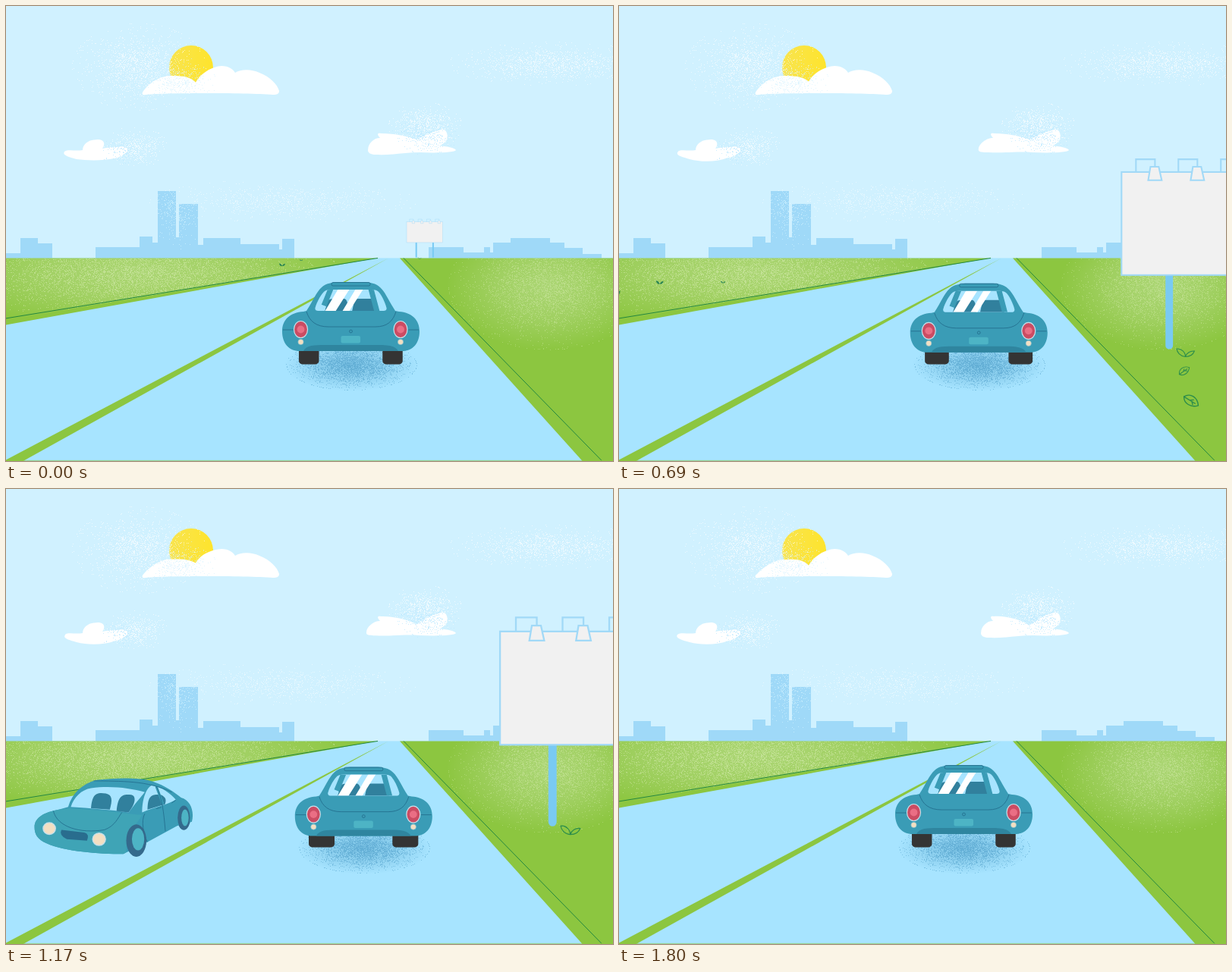
Recreate the animation shown at these times as an HTML page. Size 800 by 600 pixels, loop 1.83 s.

```html
<!DOCTYPE html>
<html lang="en">
<head>
<meta charset="utf-8">
<title>Country drive</title>
<style>
html, body { margin: 0; width: 100%; height: 100%; overflow: hidden; background: #d0f1ff; }
svg { display: block; width: 100%; height: 100%; }
.line { fill: none; stroke: #24708f; stroke-width: .9; }
.leaf { fill: none; stroke: #2b8c4b; }
</style>
</head>
<body>
<svg viewBox="0 0 800 600" preserveAspectRatio="none">
  <defs>
    <clipPath id="leftField"><path d="M0 333H488L0 414Z"/></clipPath>
    <clipPath id="rightField"><path d="M525 333H800V600H785Z"/></clipPath>
    <clipPath id="towers"><path d="M200 244H224V333H200ZM228 261H253V333H228Z"/></clipPath>
    <clipPath id="rearGlass"><path id="glassShape" d="M407.5 398C410 389 416 379 420 376C423 374 427 374 432 374H478C483 374 487 374 490 376C494 379 499 389 501.5 398C502 401 500 402 497 402H412C409 402 407 401 407.5 398Z"/></clipPath>
    <radialGradient id="haze"><stop offset="0" stop-color="#fff" stop-opacity=".28"/><stop offset=".5" stop-color="#fff" stop-opacity=".18"/><stop offset="1" stop-color="#fff" stop-opacity="0"/></radialGradient>
    <radialGradient id="shade"><stop offset="0" stop-color="#4a9cc5" stop-opacity=".45"/><stop offset=".5" stop-color="#4a9cc5" stop-opacity=".28"/><stop offset="1" stop-color="#4a9cc5" stop-opacity="0"/></radialGradient>
    <linearGradient id="sunlight"><stop offset="0" stop-color="#f8e450"/><stop offset="1" stop-color="#fee42c"/></linearGradient>
    <path id="sprout" fill="#2b8554" d="M0 .25C-.25 .3 -.45 .1 -.5 -.2C-.25 -.2 -.05 0 0 .25C.1 0 .3 -.15 .5 -.15C.45 .15 .25 .3 0 .25Z"/>
    <path id="blade" class="leaf" stroke-width=".06" d="M-.5 0C-.3 -.4 .2 -.4 .5 0C.2 .35 -.3 .35 -.5 0L.3 0M-.1 0L.1 -.15M.05 0L.2 .14"/>
    <g id="lamp">
      <path fill="none" d="M3.84 0V-3.4H8.9V-1.4"/>
      <path fill="#f1f1f1" d="M7.7 -1.4H9.9L10.7 2.2H7.1Z"/>
    </g>
    <g id="board">
      <path d="M12.7 27.4V46.2M34.9 27.4V46.2" stroke="#79caf3" stroke-width="2" stroke-linecap="round"/>
      <g stroke="#a1d9f7" stroke-width=".42">
        <rect width="47.6" height="27.45" fill="#f1f1f1"/>
        <use href="#lamp"/><use href="#lamp" x="11.3"/><use href="#lamp" x="22.6"/><use href="#lamp" x="33.9"/>
      </g>
      <path class="leaf" stroke-width=".22" d="M17 49.2C15.5 49 14.8 48 14.7 47.1C16 47 17 48 17 49.2C17.3 48.2 18.3 47.6 19.4 47.7C19 48.8 18 49.2 17 49.2Z"/>
    </g>
    <g id="tail">
      <ellipse rx="9" ry="11" fill="#cb4c63" stroke="#c5e0ea" stroke-width="1.2"/>
      <circle r="4.9" fill="#ea6e84"/>
      <circle cy="16.5" r="3.6" fill="#f3dfc2" stroke="#8cc3d0" stroke-width=".7"/>
    </g>
  </defs>

  <rect width="800" height="600" fill="#d0f1ff"/>
  <circle cx="244" cy="81" r="29" fill="url(#sunlight)"/>
  <g id="clouds" fill="#fff"></g>
  <path fill="#9fd9f8" d="M0 333V326H19V306H42V313H61V333ZM118 333V318H176V304H193V312H200V244H224V305H228V261H253V315H260V306H309V314H360V321H364V307H380V333ZM557 333V318H603V325H630V318H638V325H642V312H665V306H717V312H736V319H760V327H785V333Z"/>
  <g id="skyDust"></g>

  <g id="ground" transform="translate(0 -.6)">
    <rect y="333" width="800" height="268" fill="#a7e4ff"/>
    <path fill="#8cc640" d="M0 333H488L0 421ZM519 333H800V601H760ZM504 333L0 599V601H22Z"/>
    <g clip-path="url(#leftField)"><ellipse cx="180" cy="352" rx="290" ry="75" fill="url(#haze)"/></g>
    <g clip-path="url(#rightField)"><ellipse cx="715" cy="370" rx="135" ry="85" fill="url(#haze)"/></g>
    <g id="fieldDust"></g>
    <path d="M0 412.5L490 333M524 333L785 600" fill="none" stroke="#23873f"/>
    <path d="M0 600H800" stroke="#8cc640" opacity=".6"/>
  </g>

  <g id="roadside"></g>

  <g id="oncoming">
    <ellipse cx="377" cy="378" rx="5" ry="9" fill="#346a8c"/>
    <path fill="#3a9cb6" d="M266 385C266 378 273 374 284 372L291 370C294 360 301 353 312 350C326 348 345 348 354 351C363 354 370 359 375 363C382 365 385 373 383 381L372 384L350 396L332 405C314 405 288 403 275 397C268 394 266 390 266 385Z"/>
    <path fill="#3fa4b6" d="M266 385C266 378 273 374 284 372L292 371C307 372 322 373 336 375L346 376C342 383 335 388 334 404L332 405C314 405 288 403 275 397C268 394 266 390 266 385Z"/>
    <path fill="#a7e4ff" d="M293 370C295 363 301 357 308 356C323 354 337 356 348 359C343 365 339 370 336 374C322 372 307 371 293 370Z"/>
    <path fill="#31809d" d="M308 371C309 360 312 359 319 360C324 361 324 365 322 372ZM327 373C328 362 331 360 338 361C342 362 341 368 336 374Z"/>
    <path fill="#a7e4ff" d="M346 374C346 364 349 356 353 354C361 355 367 360 371 364.5C366 368 356 370 346 374Z"/>
    <path fill="#31809d" d="M350 372C350 362 353 360 360 361C364 363 364 365 363 368Z"/>
    <path fill="none" stroke="#3a9cb6" stroke-width="1.8" d="M356.5 354.5L361.5 368"/>
    <g class="line" style="stroke-width:.5">
      <path d="M310 350.5C330 351 350 350 368 359M356.6 354.7C361 364 362 373 363.3 388M356.6 371.3L360.3 370.2M368 367L371 365M348 375C345 380 347 391 350 396"/>
      <path d="M280 373C283 385 300 390 318 387C326 384 328 378 331 374"/>
    </g>
    <ellipse cx="377" cy="378" rx="4.6" ry="9" fill="#346a8c"/>
    <ellipse cx="377.9" cy="378" rx="2.7" ry="6.2" fill="#4db4c5"/>
    <ellipse cx="341.7" cy="395" rx="7.5" ry="12" fill="#346a8c"/>
    <ellipse cx="343" cy="394" rx="4.6" ry="8.2" fill="#4db4c5"/>
    <path fill="#296d8e" d="M286 387L303 389Q307 390 305 395L290 394Q284 391 286 387Z"/>
    <g fill="#f3dfc2" stroke="#c5e0ea" stroke-width=".8">
      <ellipse cx="277" cy="386" rx="4.6" ry="4.4"/><ellipse cx="314" cy="394" rx="4.8" ry="4.6"/>
    </g>
  </g>

  <g id="shadow"><ellipse cx="455" cy="474" rx="88" ry="34" fill="url(#shade)"/></g>
  <g fill="#343434">
    <rect id="wheelL" y="450" height="22.4" rx="4.5"/>
    <rect id="wheelR" y="450" height="22.4" rx="4.5"/>
  </g>
  <g id="car">
    <path fill="#3a9cb6" d="M364 429C364 414 374 404 392 403L396 402C404 390 409 377 416 371C421 366 430 364 440 364H470C480 364 488 366 493 371C500 377 505 390 513 402L518 403C535 404 545 414 545 429C545 445 536 455 522 455H387C373 455 364 445 364 429Z"/>
    <use href="#glassShape" fill="#a7e4ff"/>
    <g clip-path="url(#rearGlass)">
      <path fill="#31809d" d="M420 403L424 389Q426 386 432 386H446Q451 387 451 403ZM456 403L459 389Q460 386 464 386H483Q488 387 488 403Z"/>
      <path d="M428 373L419 395M481 373L489 403" stroke="#3a9cb6" stroke-width="7"/>
      <path fill="#fff" d="M420 403H434L453 373H438ZM443 403H452L471 373H461Z"/>
    </g>
    <path fill="#2f859f" d="M392 455C396 447 406 447 420 447H490C504 447 513 448 517 455Z"/>
    <g class="line">
      <path d="M396 403C400 416 409 423 425 423H487C502 423 510 416 514 403M365 427H379M530 427H544"/>
      <rect x="429" y="364.5" width="51" height="4.5" rx="2"/>
      <circle cx="454.5" cy="429" r="1.9"/>
    </g>
    <rect x="441.5" y="435" width="25.5" height="9.5" rx="2" fill="#4db4c5"/>
    <use href="#tail" x="388.5" y="426.5"/><use href="#tail" x="520" y="426.5"/>
  </g>
</svg>
<script>
const LOOP = 1830, STEP = 30, CYCLE = 1800;
const byId = id => document.getElementById(id);

function add(parent, tag, attrs) {
  const el = document.createElementNS("http://www.w3.org/2000/svg", tag);
  for (const key in attrs) el.setAttribute(key, attrs[key]);
  parent.appendChild(el);
  return el;
}

let seed = 7;
function random() {
  seed = (seed * 16807) % 2147483647;
  return seed / 2147483647;
}

// One path of pixel dots, densest in the middle of an ellipse.
function speckle(parent, cx, cy, rx, ry, count, color, opacity, clip) {
  let d = "";
  for (let i = 0; i < count; i++) {
    const r = Math.min(1.1, 0.58 * Math.sqrt(-Math.log(random()))), a = random() * 2 * Math.PI;
    d += `M${Math.round(cx + rx * r * Math.cos(a))} ${Math.round(cy + ry * r * Math.sin(a))}.5h1`;
  }
  const attrs = { d, stroke: color, opacity, "shape-rendering": "crispEdges" };
  if (clip) attrs["clip-path"] = `url(#${clip})`;
  add(parent, "path", attrs);
}

const sky = byId("skyDust"), field = byId("fieldDust");
speckle(sky, 175, 80, 80, 52, 1500, "#fff", .6);
speckle(sky, 228, 100, 44, 30, 400, "#d0f1ff", .6);
speckle(sky, 720, 76, 125, 26, 1300, "#fff", .6);
speckle(sky, 552, 158, 44, 28, 650, "#fff", .65);
speckle(sky, 552, 170, 40, 24, 400, "#c0eaff", .8);
speckle(sky, 168, 186, 42, 24, 450, "#fff", .65);
speckle(sky, 150, 190, 26, 16, 110, "#c0eaff", .8);
speckle(sky, 365, 257, 160, 26, 900, "#fff", .5);
speckle(sky, 225, 265, 34, 50, 450, "#d0f1ff", .7, "towers");
speckle(field, 170, 355, 250, 52, 6500, "#e6f3c8", .38, "leftField");
speckle(field, 715, 370, 120, 76, 4000, "#e6f3c8", .3, "rightField");
speckle(byId("shadow"), 455, 473, 78, 30, 3000, "#3b8fbe", .38);

// Boards start at the horizon and grow linearly, each along its own line.
const roadside = byId("roadside");
const mover = href => add(roadside, "use", { href });
const boards = [[0, 30, -19], [450, 34, -16.6], [900, 27.7, -21.75]]
  .map(([start, vx, vy]) => ({ start, vx, vy, el: mover("#board") }));

// x, y, vx, vy, width, growth, first moment
const sprouts = [
  [364, 341, -.542, .0556, 8, .0222, 0],
  [389, 335, -.486, .0422, 4, .0085, 0],
  [420, 336, -.41, .0405, 3, .0045, 30]
].map(motion => ({ motion, el: mover("#sprout") }));

const blades = [[.513, .38, .041, -35], [.536, .482, .057, 32]]
  .map(motion => ({ motion, el: mover("#blade") }));

const clouds = [0, 1, 2].map(() => add(byId("clouds"), "path", {}));

function place(el, visible, x, y, scale = 1, turn = 0) {
  el.style.display = visible ? "" : "none";
  el.setAttribute("transform", `translate(${x} ${y}) rotate(${turn}) scale(${scale})`);
}

function drawClouds(t) {
  const a = t / CYCLE * 2 * Math.PI;
  const late = Math.max(0, Math.min(1, (t - 900) / 450));
  const swell = (1 - Math.cos(a - .9)) / 2;
  const down = 3 * Math.sin(Math.min(a, Math.PI * .8));
  const left = -1.5 + 1.8 * Math.cos(a + .35), up = 3.5 * (1 - Math.cos(a)) / 2;
  const shift = 1.4 * (1 - Math.cos(a - .6)) / 2 + .3;
  const notch = 176 + 4 * late, valley = 101.5 - 4 * swell;
  clouds[0].setAttribute("d",
    `M180 114C186 ${104 + 4 * late} 200 ${92 + late} 219 ${92 + late}C234 92 244 94 250 ${valley}` +
    `C256 ${valley - 11} 270 80 284 79C293 79 299 83 302 88C310 83 323 83 334 88C348 93 358 104 360 112` +
    "C360 116 357 117 352 117C320 115 220 114 184 117C180 118 179 116 180 114Z");
  clouds[1].setAttribute("d",
    `M${76 + shift} 193C79 188 92 192 101 190C101 183 108 177 116 176.5C129 174 132 181 127 188` +
    `C138 186 152 184 159 187C164 191 154 199 143 ${201 - down / 3}` +
    `C128 ${204 + down} 108 ${204 + down} 93 202C83 199 75 197 ${76 + shift} 193Z`);
  clouds[2].setAttribute("d",
    `M${477 + left} 189C${477 + left} 182 484 174 493 174C489 170 489 167 494 168C510 ${168 - late} 530 172 541 ${notch}` +
    "C552 171 562 166 574 163C580 161 584 170 580 178C575 183 572 184 570 184C580 185 592 187 593 190" +
    `C592 193 570 194 545 193C525 ${193 - up / 2} 510 ${197 - up} 487 ${196 - up}` +
    `C480 ${196 - up} ${476 + left} 193 ${477 + left} 189Z`);
}

function drawCar(t) {
  const peak = 870;
  const swing = t < peak ? t / peak : (CYCLE - t) / (CYCLE - peak);
  const dx = 11 * (1 - Math.cos(Math.PI * swing));
  const dip = (1 - Math.cos(4 * Math.PI * t / CYCLE)) / 2;
  place(byId("car"), true, dx, 4 * dip);
  place(byId("shadow"), true, dx, 0);
  const width = 26.5 + 11.5 * dip;
  for (const [id, center] of [["wheelL", 399.2], ["wheelR", 509.5]]) {
    byId(id).setAttribute("x", center + dx - width / 2);
    byId(id).setAttribute("width", width);
  }
}

function render(t) {
  drawClouds(t);
  for (const { start, vx, vy, el } of boards) {
    const grown = (t - start) * .01646;
    place(el, grown >= 0 && grown < 11, 528 + vx * grown, 284.5 + vy * grown, 1 + grown);
  }
  for (const { motion: [x, y, vx, vy, width, growth, start], el } of sprouts) {
    place(el, t >= start && t < 1000, x + vx * t, y + vy * t, width + growth * t);
  }
  for (const { motion: [vx, vy, growth, turn], el } of blades) {
    const age = t - 300;
    place(el, age > 0 && age < 560, 545 + vx * age, 333 + vy * age, growth * age, turn);
  }
  const age = t - 1020, scale = 1 + age * .00515;
  place(byId("oncoming"), t >= 900 && t < 1500,
    384 - .915 * age - 384 * scale, 378 + .37 * age - 378 * scale, scale);
  drawCar(t);
}

const began = performance.now();
function tick() {
  const t = (performance.now() - began) % LOOP;
  render(Math.floor(t / STEP) * STEP);
  requestAnimationFrame(tick);
}
tick();
</script>
</body>
</html>
```
